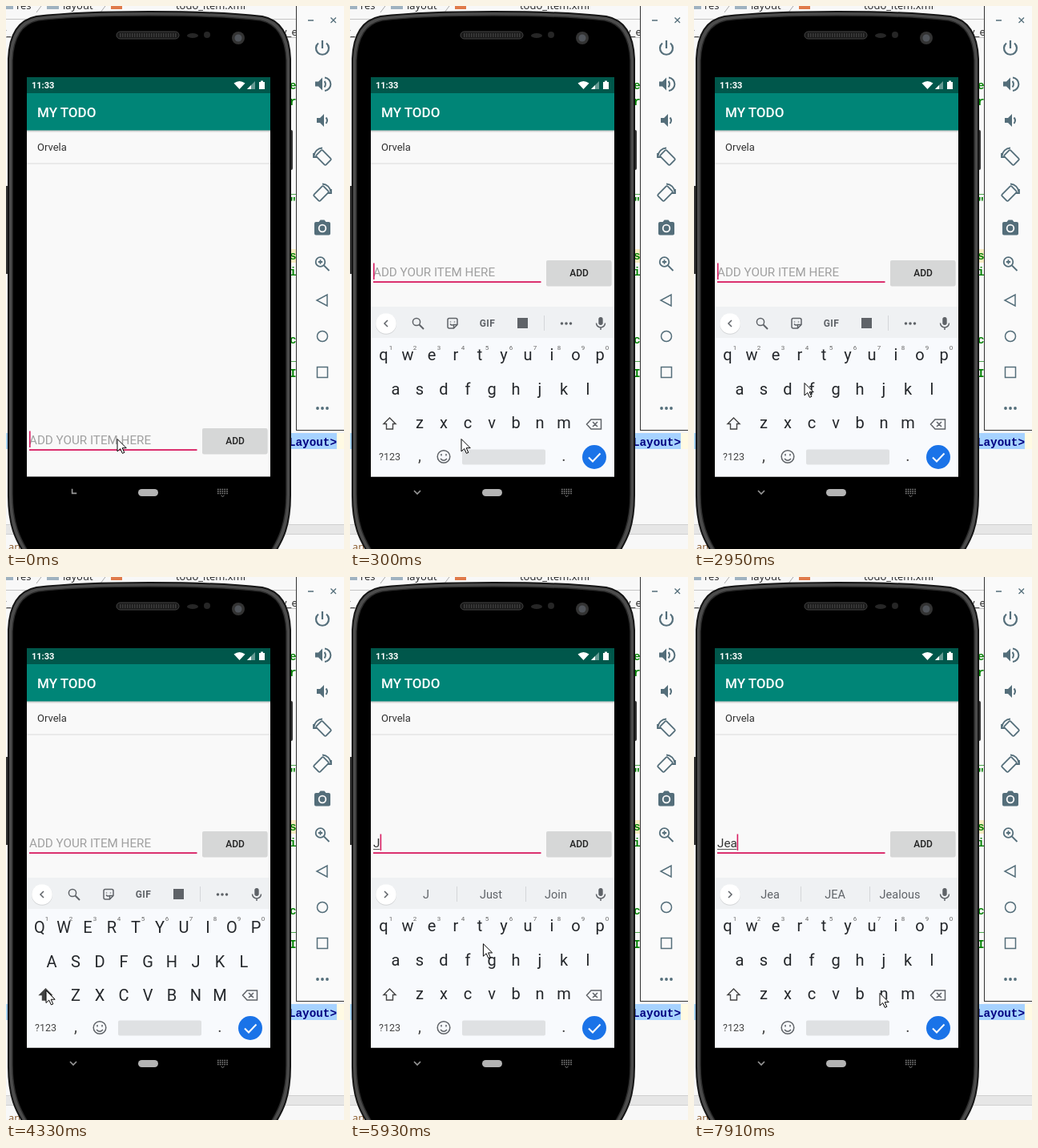
Write an HTML page that moves like this. It is 422x679 px and loops after 8000 ms.

```html
<!DOCTYPE html>
<html lang="en">
<head>
<meta charset="utf-8">
<title>Todo app</title>
<style>
html, body { margin: 0; width: 100%; height: 100%; overflow: hidden; background: #f8f8f8; }
svg { display: block; width: 422px; height: 679px; }
text { font-family: Roboto, sans-serif; white-space: pre; }
.code text { font: bold 14.3px "Liberation Mono", monospace; }
.code .label { font: 13px "Open Sans", sans-serif; }
.mid { text-anchor: middle; }
.line { fill: none; stroke: #5f6368; stroke-width: 1.5; }
.tool { fill: none; stroke: #546e7a; stroke-width: 1.8; }
.solid { fill: #546e7a; stroke: none; }
</style>
</head>
<body>
<svg viewBox="0 0 422 679">
  <defs>
    <clipPath id="screen"><rect x="26" y="89" width="304" height="499.500"/></clipPath>
    <linearGradient id="shade" x2="0" y2="1"><stop stop-color="#000" stop-opacity=".22"/><stop offset="1" stop-color="#000" stop-opacity="0"/></linearGradient>
    <g id="rotate">
      <rect x="-8.500" y="-5.500" width="17" height="11" rx="1.500" transform="translate(1.500 1.500)rotate(45)"/>
      <path d="M-10.500 0A11 11 0 0 1 0 -10.500M-11 -4V1H-6.500" stroke-width="1.800"/>
    </g>
    <path id="speaker" class="solid" d="M-8 -3H-4L1 -8V8L-4 3H-8Z"/>
  </defs>

  <!-- editor behind the phone -->
  <g class="code">
    <path d="M0 16.500H422M0 39.500H422" stroke="#c4c4c4"/>
    <g fill="#222">
      <text class="label" x="13" y="4">res</text>
      <text class="label" x="71" y="4">layout</text>
      <text class="label" x="212" y="4">todo_item.xml</text>
      <text class="label" x="-6" y="37">y_</text>
      <text class="label" x="344" y="37">y_e</text>
    </g>
    <path d="M0 0H9V4H0ZM51 0H66V4H51Z" fill="#9fb2c0"/>
    <path d="M131 0H145V4H131Z" fill="#e07a4a"/>
    <path d="M38 8L44 0M118 8L124 0" stroke="#aaa"/>
    <rect x="350" y="304" width="20" height="17" fill="#f7ebc0"/>
    <g id="scraps" fill="#008000"></g>
    <rect y="534" width="413" height="20" fill="#a6d2ff"/>
    <rect x="413" y="534" width="9" height="20" fill="#fffae3"/>
    <text x="413" y="549.500" text-anchor="end" fill="#000080">Layout&gt;</text>
    <rect y="648" width="422" height="12" fill="#e6e6e6"/>
    <path d="M0 648.500H422M0 660.500H422" stroke="#d0d0d0"/>
    <text class="label" x="3" y="681" fill="#8a5a2b">an</text>
  </g>

  <!-- phone body -->
  <rect x="-2" y="225" width="7" height="110" rx="2" fill="#333"/>
  <rect x="352" y="155" width="6" height="50" rx="2" fill="#333"/>
  <path d="M3 66C4 40 12 18 38 13Q90 7 179 7Q268 7 320 13C346 18 354 40 355 66V612C355 650 346 668 334 686H24C12 668 3 650 3 612Z" fill="#4c4c4c" stroke="#141414" stroke-width="2"/>
  <path d="M8 68C9 44 16 23 40 18Q90 12 179 12Q268 12 318 18C342 23 349 44 350 68V610C350 646 341 666 328 686H30C17 666 8 646 8 610Z" fill="#000" stroke="#2c2c2c" stroke-width="1.500"/>
  <rect x="138" y="32" width="78" height="9" rx="4.500" fill="#1a1a1a" stroke="#444"/>
  <path d="M142 36.500H213" stroke="#3c3c3c" stroke-width="5" stroke-dasharray="1.500 1.500"/>
  <ellipse cx="233" cy="37" rx="7" ry="3" fill="#262626"/>
  <circle cx="251" cy="36" r="4" fill="#262626"/>
  <circle cx="290" cy="40" r="8" fill="#333"/><circle cx="290" cy="40" r="4.500" fill="#50545a"/>

  <!-- app -->
  <g clip-path="url(#screen)">
    <rect x="26" y="89" width="304" height="500" fill="#f9f9f9"/>
    <rect x="26" y="109" width="304" height="46.500" fill="#008577"/>
    <rect x="26" y="89" width="304" height="20" fill="#00574b"/>
    <rect x="26" y="155.500" width="304" height="3" fill="url(#shade)"/>
    <g fill="#fff">
      <text x="32" y="102.500" font-size="11" font-weight="700">11:33</text>
      <path d="M284.500 96.500Q291.500 91.500 298.500 96.500L291.500 104ZM316 95H318V93.500H321V95H323V104H316Z"/>
      <path d="M301 104L311 94V104Z" opacity=".4"/><path d="M301 104L306 99V104Z"/>
      <text x="39" y="139" font-size="17" font-weight="500">MY TODO</text>
    </g>
    <text x="39" y="181" font-size="13" fill="#333">Orvela</text>
    <rect x="26" y="196.500" width="304" height="1" fill="#dcdcdc"/>
    <g id="entry">
      <text id="hint" x="29" y="338" font-size="15.200" fill="#a0a0a0">ADD YOUR ITEM HERE</text>
      <text id="typed" x="29" y="338" font-size="15.200" fill="#333"></text>
      <rect id="compose" x="29" y="340" height="1" fill="#555"/>
      <rect x="29" y="344.200" width="209.500" height="1.800" fill="#d81b60"/>
      <rect id="caret" y="321.500" width="1.600" height="20.500" fill="#d81b60"/>
      <rect x="245" y="319" width="81.500" height="31.500" rx="2" fill="#000" opacity=".14"/>
      <rect x="245" y="318" width="81.500" height="31.500" rx="2" fill="#d6d7d7"/>
      <text class="mid" x="286" y="338" font-size="12" font-weight="500" fill="#222">ADD</text>
    </g>

    <g id="keyboard">
      <rect x="26" y="376" width="304" height="213" fill="#f8fafd"/>
      <rect x="26" y="376" width="304" height="39" fill="#eff1f3"/>
      <circle cx="45" cy="397.800" r="13" fill="#000" opacity=".12"/>
      <circle cx="45" cy="397" r="12.800" fill="#fff"/>
      <path id="arrow" class="line" d="M2 -4L-2 0L2 4"/>
      <g id="tools" class="line">
        <circle cx="83" cy="395" r="4.600"/><path d="M86.500 398.500L92 404" stroke-width="2"/>
        <path d="M124 390.500H132Q134 390.500 134 392.500V398.500L129.500 403H124Q122 403 122 401V392.500Q122 390.500 124 390.500ZM134 398.500H129.500V403M125 397.500Q127 400 129 398.500M125.500 394.500V395.500M130.500 394.500V395.500"/>
        <text class="mid" x="171.500" y="401" font-size="12" font-weight="700" fill="#5f6368" stroke="none" letter-spacing=".4">GIF</text>
        <rect x="209" y="390" width="13" height="13" fill="#5f6368" stroke="none"/>
        <path d="M242.500 387V406" stroke="#d4d6d9" stroke-width="1"/>
        <path d="M262.500 397H277.500" stroke-width="3.600" stroke-linecap="round" stroke-dasharray="0 5.500" stroke-dashoffset="-2"/>
      </g>
      <g id="words">
        <path d="M133.500 387V406M219.500 387V406" stroke="#d4d6d9"/>
        <g class="mid" font-size="14.500" fill="#5f6368"><text x="95" y="402"></text><text x="176" y="402"></text><text x="257" y="402"></text></g>
      </g>
      <rect x="310.300" y="389" width="5.400" height="10" rx="2.700" fill="#5f6368"/>
      <path class="line" d="M307.500 396.500A5.500 5.500 0 0 0 318.500 396.500M313 402V405"/>
      <g id="keys" class="mid" font-size="20" fill="#24272b"></g>
      <path id="shift" d="M49.500 515L57 522.500H53.500V529H45.500V522.500H42Z" stroke="#444" stroke-width="1.400"/>
      <path class="line" d="M301 517H313.500V529H301L295.500 523ZM303 520L309 526M309 520L303 526"/>
      <g class="mid" fill="#444">
        <text x="49.500" y="568" font-size="12.500">?123</text>
        <text x="87" y="569" font-size="20">,</text><text x="267" y="569" font-size="20">.</text>
      </g>
      <circle class="line" cx="117" cy="563.500" r="7.800"/>
      <path class="line" d="M113 566Q117 570.500 121 566M114 560V562.500M120 560V562.500"/>
      <rect x="140" y="554.500" width="104" height="19" rx="2" fill="#dfe1e3"/>
      <circle cx="305" cy="564" r="15" fill="#1a73e8"/>
      <path d="M298 564.500L303 569.500L312.500 559.500" fill="none" stroke="#fff" stroke-width="2"/>
    </g>
  </g>

  <!-- navigation bar -->
  <path id="back" d="M-4 -2L0 2L4 -2" fill="none" stroke="#999" stroke-width="1.600"/>
  <rect x="165" y="604" width="25" height="9" rx="4.500" fill="#b4b4b4"/>
  <path d="M264 604.500H277M264 607H277M264 609.500H277" stroke="#858585" stroke-width="1.500" stroke-dasharray="1.600 1.200"/>
  <path d="M268.500 612L270.500 613.500L272.500 612" stroke="#858585" fill="none"/>

  <!-- emulator panel -->
  <rect x="362.500" y="-1" width="62" height="531.500" fill="#fafafa" stroke="#333"/>
  <g class="tool">
    <path d="M377 18H384M405.500 14.500L412 21M412 14.500L405.500 21" stroke-width="1.300"/>
    <path d="M390 46.500A8 8 0 1 0 400 46.500M395 43V53" stroke-width="2.200"/>
    <use href="#speaker" x="394" y="97.500"/>
    <path d="M397.500 94Q400.500 97.500 397.500 101.500M398 89.500A8.300 8.300 0 0 1 398 106" stroke-width="2"/>
    <use href="#speaker" x="396" y="143"/>
    <path d="M399.500 139.500Q402.500 143 399.500 147" stroke-width="2"/>
    <use href="#rotate" x="395" y="188"/>
    <use href="#rotate" transform="translate(395 233)scale(-1 1)"/>
    <path class="solid" d="M387 270H390.500L392.500 267.500H397.500L399.500 270H403Q405 270 405 272V284.500Q405 286.500 403 286.500H387Q385 286.500 385 284.500V272Q385 270 387 270Z"/>
    <circle cx="395" cy="278" r="4.300" stroke="#fafafa"/>
    <circle cx="392.500" cy="320" r="5.800"/><path d="M397 324.500L403.500 331M389.800 320H395.200M392.500 317.300V322.700"/>
    <path d="M401 361V375L388 368Z" stroke-width="1.500"/>
    <circle cx="395" cy="413" r="6.500" stroke-width="1.500"/>
    <rect x="388.500" y="451.500" width="13" height="13" stroke-width="1.500"/>
    <g class="solid"><circle cx="389" cy="503" r="1.900"/><circle cx="395" cy="503" r="1.900"/><circle cx="401" cy="503" r="1.900"/></g>
  </g>

  <path id="pointer" d="M0 .5V16L3.700 12.600L6.400 18.400L8.800 17.400L6.200 11.700H11.200Z" fill="#fff" stroke="#000"/>
</svg>

<script>
const LOOP = 8000, TICK = 141.2;
const $ = id => document.getElementById(id);
const show = (el, on) => el.style.display = on ? '' : 'none';
const move = (el, x, y, more = '') => el.setAttribute('transform', `translate(${x} ${y})${more}`);

function addText(parent, x, y, value, attrs = {}) {
  const el = document.createElementNS('http://www.w3.org/2000/svg', 'text');
  for (const [k, v] of Object.entries({ x, y, ...attrs })) el.setAttribute(k, v);
  el.textContent = value;
  return parent.appendChild(el);
}

// code peeking out between phone and panel
Object.entries({ 104: 'er', 124: 're', 234: '_l', 250: '"', 317: 'sc', 337: 'il', 422: 'cc', 443: '_c', 464: 'It' })
  .forEach(([y, s]) => addText($('scraps'), 354, y, s));

const keys = [];
[['qwertyuiop', 42, 443], ['asdfghjkl', 57, 485.5], ['zxcvbnm', 87, 528]].forEach(([row, x, y], r) =>
  [...row].forEach((letter, i) => {
    keys.push({ el: addText($('keys'), x + 30 * i, y, letter), letter, y });
    if (!r) addText($('keys'), x + 9 + 30 * i, 429.5, (i + 1) % 10, { 'font-size': 8, fill: '#666' });
  }));

// time, text, caret position, suggestions
const typing = [
  [0, '', 29, []],
  [5650, 'J', 37.6, ['J', 'Just', 'Join']],
  [6400, 'Je', 45.4, ['Je', 'He', 'Jets']],
  [6900, 'Jea', 53.6, ['Jea', 'JEA', 'Jealous']],
];

// time, x, y of the mouse pointer
const path = [
  [0, 139, 541], [1271, 139, 541], [1550, 141, 454], [1835, 143, 446], [2400, 139, 456], [2683, 139, 456],
  [2820, 138, 471], [3110, 138, 471], [3530, 49, 514], [3800, 49, 514], [3950, 50, 516.5], [4520, 50, 516.5],
  [5220, 235, 478.5], [5510, 235, 478.5], [6350, 98, 438], [6630, 67, 474], [6900, 67, 474],
  [7480, 231, 511], [7760, 232, 520], [LOOP, 232, 520],
];

function pointerAt(t) {
  const i = path.findIndex(p => p[0] > t);
  const [t0, x0, y0] = path[i - 1], [t1, x1, y1] = path[i];
  const k = (t - t0) / (t1 - t0), e = k * k * (3 - 2 * k);
  return [x0 + (x1 - x0) * e, y0 + (y1 - y0) * e];
}

function draw(t) {
  const [since, value, caretX, words] = typing.findLast(s => s[0] <= t);
  const open = t >= 150, upper = t >= 4330 && t < 5650;

  move($('entry'), 0, open ? 0 : 210);
  show($('keyboard'), open);
  move($('keyboard'), 0, t < 300 ? 40 : 0);
  move($('back'), 84, 608, `rotate(${t < 150 ? 45 : t < 300 ? 12 : 0})`);

  show($('hint'), !value);
  $('typed').textContent = value;
  $('compose').setAttribute('width', value ? caretX - 29.4 : 0);
  $('caret').setAttribute('x', caretX);
  const blink = value ? t - since : t + 170;
  show($('caret'), t < 420 || Math.floor(blink / 500) % 2 === 0);

  move($('arrow'), 45, 397, value ? 'scale(-1 1)' : '');
  show($('tools'), !value);
  show($('words'), value);
  $('words').querySelectorAll('text').forEach((el, i) => el.textContent = words[i] || '');

  for (const { el, letter, y } of keys) {
    el.textContent = upper ? letter.toUpperCase() : letter;
    el.setAttribute('y', upper ? y + 2.2 : y);
  }
  $('shift').setAttribute('fill', upper ? '#444' : 'none');

  move($('pointer'), ...pointerAt(Math.floor((t + 20) / TICK) * TICK % LOOP));
}

const start = performance.now();
function frame() {
  draw((performance.now() - start) % LOOP);
  requestAnimationFrame(frame);
}
frame();
</script>
</body>
</html>
```
